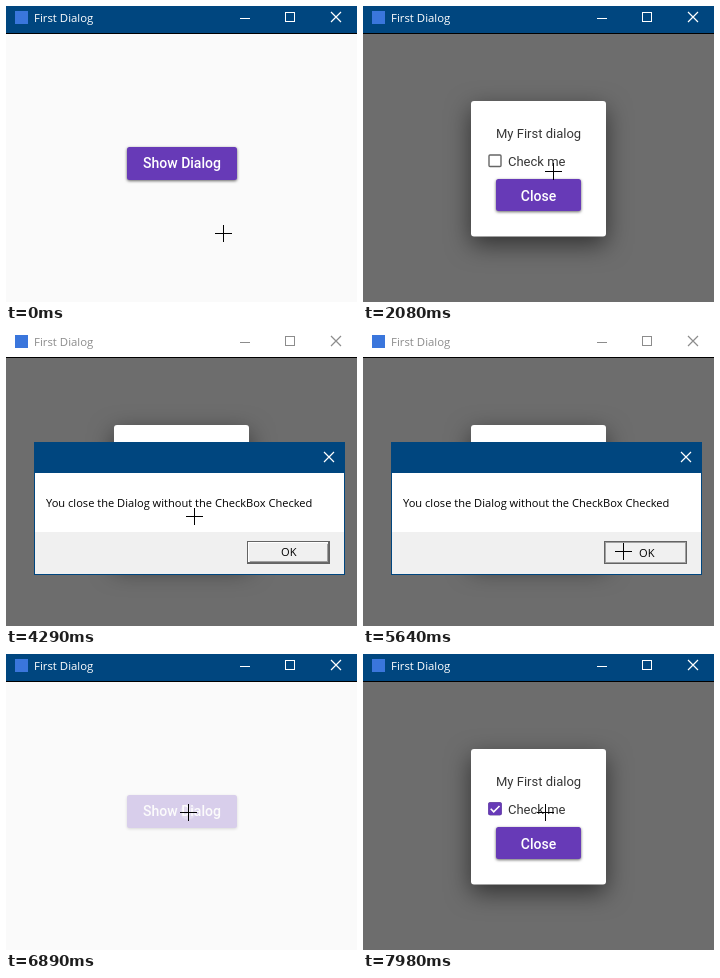
Recreate the animation shown at these times as an HTML page. Size 351 by 296 pixels, loop 8000 ms.

```html
<!DOCTYPE html>
<html lang="en">
<head>
<meta charset="utf-8">
<title>First Dialog</title>
<style>
html, body { margin: 0; width: 100%; height: 100%; overflow: hidden; background: #fafafa; }
svg { display: block; width: 100vw; height: 100vh; }
text { white-space: pre; }
.sys { font-family: "Open Sans", "Noto Sans", sans-serif; font-size: 11.1px; }
.label { font: 13px Roboto, sans-serif; fill: #363636; }
.caps { font: 500 14px Roboto, sans-serif; fill: #fff; text-anchor: middle; }
.crisp { shape-rendering: crispEdges; }
.raised { fill: #673ab7; filter: drop-shadow(0 1px 1.5px rgba(0,0,0,.6)); }

/* 1% of the loop is 80 ms */
.anim { animation: 8s linear infinite; }

.bar { color: #fff; fill: #00467f; animation-name: bar; animation-timing-function: step-end; }
@keyframes bar {
  0%, 71.75% { color: #fff; fill: #00467f; }
  51.125% { color: #8c8c8c; fill: #fff; }
}

.show { animation-name: show; animation-timing-function: step-end; }
@keyframes show {
  0%, 71.875% { opacity: 1; }
  13.875%, 86.1% { opacity: .23; }
}

.shade { opacity: 0; animation-name: shade; }
@keyframes shade {
  0%, 14.375%, 75.625%, 86.625% { opacity: 0; }
  18.125%, 71.875%, 90.375%, 100% { opacity: .56; }
}

.dialog { transform-origin: 175.5px 163px; animation-name: dialog; }
@keyframes dialog {
  0%, 14.375%, 75.625%, 86.625% { transform: scale(0); opacity: 0; }
  18.125%, 71.875%, 90.375%, 100% { transform: scale(1); opacity: 1; }
}
.card { fill: #fff; filter: drop-shadow(0 8px 12px rgba(0,0,0,.55)); }

.ripple { fill: #fff; opacity: 0; }
.ripple.open { animation-name: ripple-open; }
@keyframes ripple-open {
  0%, 13.87% { transform: translate(190px,165px) scale(7); opacity: 0; }
  13.875% { transform: translate(190px,165px) scale(7); opacity: .3; }
  14.875% { transform: translate(190px,165px) scale(27); opacity: .3; }
  17.6% { transform: translate(190px,165px) scale(80); opacity: 0; }
  86.05% { transform: translate(182px,158px) scale(7); opacity: 0; }
  86.1% { transform: translate(182px,158px) scale(7); opacity: .3; }
  87.1% { transform: translate(182px,158px) scale(27); opacity: .3; }
  89.9%, 100% { transform: translate(182px,158px) scale(80); opacity: 0; }
}
.ripple.shut { animation-name: ripple-shut; }
@keyframes ripple-shut {
  0%, 50.12% { transform: translate(188px,186px) scale(7); opacity: 0; }
  50.125% { transform: translate(188px,186px) scale(7); opacity: .3; }
  51.125% { transform: translate(188px,186px) scale(27); opacity: .3; }
  53.5%, 100% { transform: translate(188px,186px) scale(80); opacity: 0; }
}

.ticked { opacity: 0; animation-name: tick; }
@keyframes tick {
  0%, 98.55% { opacity: 0; }
  99.3%, 100% { opacity: 1; }
}

.alert { transform-origin: 183.5px 178px; animation-name: alert; }
@keyframes alert {
  0%, 51.375% { transform: scale(.92); opacity: 0; }
  53.6%, 71.1% { transform: none; opacity: 1; }
  71.75%, 100% { transform: scale(.96); opacity: 0; }
}

.up { animation-name: up; animation-timing-function: step-end; }
.down { opacity: 0; animation-name: down; animation-timing-function: step-end; }
@keyframes up { 0% { opacity: 1; } 70%, 100% { opacity: 0; } }
@keyframes down { 0% { opacity: 0; } 70%, 100% { opacity: 1; } }

.cursor { animation-name: move; animation-timing-function: ease-in-out; }
@keyframes move {
  0%, .5% { transform: translate(217px,227px); }
  5.875%, 13.875% { transform: translate(192px,173px); }
  14.75%, 26.125% { transform: translate(190px,165px); }
  31.125%, 36.5% { transform: translate(184px,126px); }
  45.5%, 62.875% { transform: translate(188px,186px); }
  69%, 73.75% { transform: translate(260px,221px); }
  81.125%, 100% { transform: translate(182px,158px); }
}
</style>
</head>
<body>
<svg viewBox="0 0 351 296" preserveAspectRatio="none">
  <defs>
    <clipPath id="show-clip"><rect x="121" y="141" width="110" height="33" rx="2.5"/></clipPath>
    <clipPath id="close-clip"><rect x="133" y="173" width="85" height="32" rx="2.5"/></clipPath>
    <path id="cross" d="M0 0L10 10M10 0L0 10" fill="none" stroke-width="1.2"/>
  </defs>

  <rect width="351" height="296" fill="#fafafa"/>

  <g class="anim show">
    <rect class="raised" x="121" y="141" width="110" height="33" rx="2.5"/>
    <text class="caps" x="176" y="162">Show Dialog</text>
    <g clip-path="url(#show-clip)"><circle class="anim ripple open" r="1"/></g>
  </g>

  <rect class="anim shade" y="28" width="351" height="268"/>

  <g class="anim dialog">
    <rect class="card" x="108" y="95" width="135" height="135.5" rx="3"/>
    <text class="label" x="133" y="132">My First dialog</text>
    <rect x="126" y="149" width="12" height="11.5" rx="1" fill="#fff" stroke="#666" stroke-width="1.4"/>
    <g class="anim ticked">
      <rect x="125.2" y="148.2" width="13.6" height="13" rx="1.6" fill="#673ab7"/>
      <path d="M127.7 154.8l3 3 5.8-5.8" fill="none" stroke="#fff" stroke-width="1.6"/>
    </g>
    <text class="label" x="145" y="160">Check me</text>
    <rect class="raised" x="133" y="173" width="85" height="32" rx="2.5"/>
    <text class="caps" x="175.5" y="195">Close</text>
    <g clip-path="url(#close-clip)"><circle class="anim ripple shut" r="1"/></g>
  </g>

  <g class="anim bar">
    <rect width="351" height="27"/>
    <rect y="27" width="351" height="1" fill="#000"/>
    <rect x="9" y="5" width="13" height="13" fill="#3a76dc"/>
    <text class="sys" x="28" y="16" style="font-size:11.4px" fill="currentColor">First Dialog</text>
    <path class="crisp" d="M234 12.5h10M279.5 6.5h9v9h-9z" fill="none" stroke="currentColor"/>
    <use href="#cross" x="325" y="6" stroke="currentColor"/>
  </g>

  <g class="anim alert">
    <rect x="28" y="112" width="311" height="133" fill="#00467f"/>
    <rect x="29" y="143" width="309" height="59" fill="#fff"/>
    <rect x="29" y="202" width="309" height="42" fill="#f0f0f0"/>
    <use href="#cross" x="318" y="122" stroke="#fff"/>
    <text class="sys" x="40" y="177">You close the Dialog without the CheckBox Checked</text>
    <g class="anim up">
      <g class="crisp" fill="none">
        <rect x="241.5" y="211.5" width="82" height="22" stroke="#646464"/>
        <path d="M242.5 232v-19.5H322" stroke="#fff"/>
        <path d="M242 232.5h80.5V212" stroke="#696969"/>
        <path d="M244 231.5h77.5V214" stroke="#a0a0a0"/>
      </g>
      <text class="sys" x="275" y="226">OK</text>
    </g>
    <g class="anim down">
      <g class="crisp" fill="none">
        <rect x="241.5" y="211.5" width="82" height="22" stroke="#646464"/>
        <rect x="242.5" y="212.5" width="80" height="20" stroke="#a0a0a0"/>
      </g>
      <text class="sys" x="276" y="227">OK</text>
    </g>
  </g>

  <g class="anim cursor crisp">
    <rect x="-8" width="17" height="1"/>
    <rect y="-8" width="1" height="17"/>
  </g>
</svg>
</body>
</html>
```
